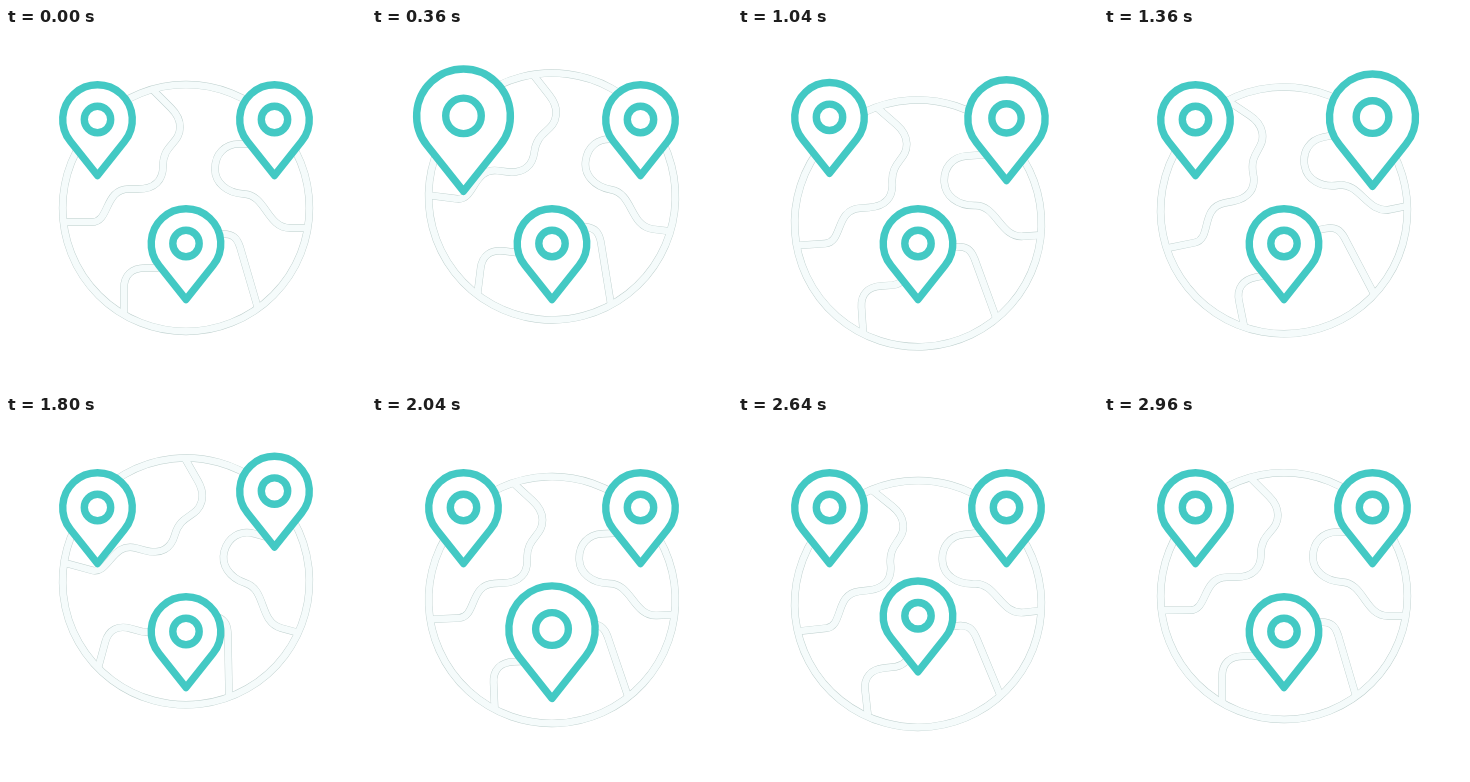
An HTML page that plays this animation: 360 by 360 pixels, repeating every 3000 ms.

```html
<!DOCTYPE html>
<html lang="en">
<head>
<meta charset="utf-8">
<title>Globe with pins</title>
<style>
  html, body { margin: 0; width: 100%; height: 100%; overflow: hidden; background: #fff; }
  svg { display: block; width: 100%; height: 100%; }
  .line { fill: none; stroke-linecap: round; stroke-linejoin: round; }
  .edge { stroke: #bccecc; stroke-width: 7.5; }
  .face { stroke: #f5fbfb; stroke-width: 6.7; }
  .pin { fill: #fff; stroke: #43c9c4; stroke-linejoin: round; }
</style>
</head>
<body>
<svg viewBox="0 0 360 360">
  <defs>
    <clipPath id="disc"><circle cx="180" cy="180" r="124"/></clipPath>
    <g id="land" clip-path="url(#disc)">
      <path d="M54 194H86C104 194 98 161 123 161H132C149 161 157 152 157 138C157 116 174 116 174 99C174 91 170 85 165 80L146 61"/>
      <path d="M306 200H284C261 200 260 167 238 166C220 165 209 154 209 141C209 126 219 116 233 116H250"/>
      <path d="M118 284V260C118 247 126 240 139 240H151C172 238 176 206 205 206H217C227 206 231 210 234 219L253 284"/>
    </g>
    <circle id="rim" cx="180" cy="180" r="123.4"/>
    <g id="mark">
      <path d="M0 56L-27 22A34.8 34.8 0 1 1 27 22Z"/>
      <circle r="13.2"/>
    </g>
  </defs>
  <g id="globe">
    <g class="line edge"><use href="#land"/><use href="#rim"/></g>
    <g class="line face"><use href="#land"/><use href="#rim"/></g>
  </g>
  <use class="pin" href="#mark"/>
  <use class="pin" href="#mark"/>
  <use class="pin" href="#mark"/>
</svg>
<script>
  const LOOP = 3000;
  const MID = 10.5; // pin's visual middle below its ring centre
  const WEIGHT = 7.4; // outline width, the same at every pin size
  const globe = document.getElementById('globe');
  const marks = document.querySelectorAll('.pin');
  const pins = [[91.5, 91.5, 0], [268.5, 91.5, 933], [180, 215.5, 1867]];

  // Each key is [time, value]
  const turnKeys = [[0, 0], [750, 15], [1250, -15], [1750, 16], [2250, -13.5], [LOOP, 0]];
  const liftKeys = [[0, 0], [560, -16], [1090, 16], [1700, -17], [2280, 16], [LOOP, 0]];

  const ease = x => (1 - Math.cos(Math.PI * x)) / 2;

  function track(keys, t) {
    const i = keys.findIndex(k => k[0] > t);
    const [t0, a] = keys[i - 1], [t1, b] = keys[i];
    return a + (b - a) * ease((t - t0) / (t1 - t0));
  }

  // Half sine wave between two times, zero elsewhere
  const hump = (t, from, to) =>
    t > from && t < to ? Math.sin(Math.PI * (t - from) / (to - from)) : 0;

  function draw(now) {
    const t = now % LOOP;
    globe.setAttribute('transform',
      `translate(0 ${track(liftKeys, t)}) rotate(${track(turnKeys, t)} 180 180)`);
    pins.forEach(([x, y, start], i) => {
      const p = t - start;
      const scale = 1 + 0.385 * hump(p, 0, 600) ** 2;
      const jump = 17 * hump(p, 600, 1060);
      marks[i].setAttribute('stroke-width', WEIGHT / scale);
      marks[i].setAttribute('transform',
        `translate(${x} ${y + MID - jump}) scale(${scale}) translate(0 ${-MID})`);
    });
  }

  const begin = performance.now();
  function loop() {
    draw(performance.now() - begin);
    requestAnimationFrame(loop);
  }
  loop();
</script>
</body>
</html>
```
